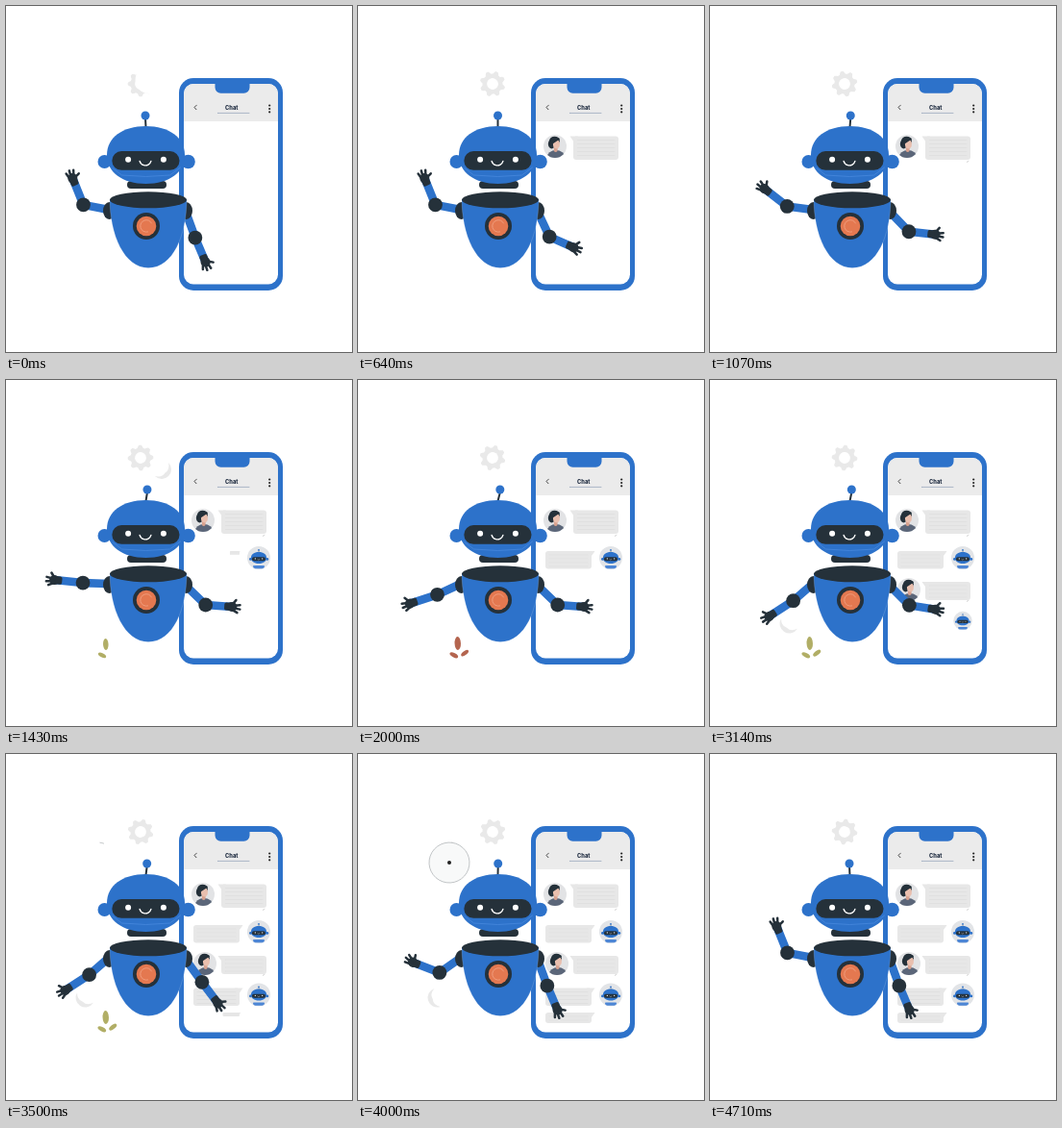
An HTML page with a canvas for the animation above (4.78 s loop, 360x360 px).

```html
<!DOCTYPE html>
<html lang="en">
<head>
<meta charset="utf-8">
<title>Chat robot</title>
<style>
html, body { margin: 0; width: 100%; height: 100%; overflow: hidden; background: #fff; }
canvas { display: block; width: 360px; height: 360px; }
</style>
</head>
<body>
<canvas id="stage"></canvas>
<script>
const LOOP = 4780;
const BLUE = '#2d72ca', DARK = '#25313a', GREY = '#e7e7e7', PALE = '#e9e9e9', HEADER = '#ebebeb';
const canvas = document.getElementById('stage');
const ctx = canvas.getContext('2d');
const ratio = window.devicePixelRatio || 1;
canvas.width = canvas.height = 360 * ratio;

const rad = deg => deg * Math.PI / 180;
const clamp = v => Math.max(0, Math.min(1, v));
const span = (t, from, to) => clamp((t - from) / (to - from));
const easeOut = p => 1 - (1 - p) ** 2;
const grow = (t, from, to) => easeOut(span(t, from, to));

// Interpolates rows of [time, ...values].
function track(rows, t) {
  const next = rows.findIndex(row => row[0] > t);
  if (next === 0) return rows[0].slice(1);
  if (next < 0) return rows[rows.length - 1].slice(1);
  const a = rows[next - 1], b = rows[next], p = span(t, a[0], b[0]);
  return a.slice(1).map((v, i) => v + (b[i + 1] - v) * p);
}

// Rows of [time, upper arm, forearm, hand], angles in degrees.
const LEFT_ARM = [
  [720, 191, 248, 262], [1140, 187, 212, 222], [1430, 182, 186, 188], [1800, 165, 171, 172],
  [2330, 139, 147, 155], [3500, 139, 147, 155], [4000, 145, 201, 230], [4640, 191, 248, 262]
];
const RIGHT_ARM = [
  [150, 70, 67, 62], [640, 65, 24, 18], [1120, 44, 4, 2],
  [3100, 44, 4, 2], [3500, 54, 53, 48], [3850, 70, 67, 62]
];

function fill(color) { ctx.fillStyle = color; ctx.fill(); }

function ellipse(x, y, rx, ry, color) {
  ctx.beginPath();
  ctx.ellipse(x, y, rx, ry, 0, 0, Math.PI * 2);
  fill(color);
}
const disc = (x, y, r, color) => ellipse(x, y, r, r, color);

function box(x, y, w, h, r, color) {
  ctx.beginPath();
  ctx.roundRect(x, y, w, h, r);
  fill(color);
}

function stroke(color, width) {
  ctx.strokeStyle = color;
  ctx.lineWidth = width;
  ctx.lineCap = ctx.lineJoin = 'round';
  ctx.stroke();
}

function line(points, color, width) {
  ctx.beginPath();
  points.forEach(([x, y]) => ctx.lineTo(x, y));
  stroke(color, width);
}

function arc(x, y, r, from, to, color, width) {
  ctx.beginPath();
  ctx.arc(x, y, r, rad(from), rad(to));
  stroke(color, width);
}

function place(x, y, scale, angle, draw) {
  if (scale <= 0) return;
  ctx.save();
  ctx.translate(x, y);
  ctx.rotate(rad(angle));
  ctx.scale(scale, scale);
  draw();
  ctx.restore();
}

function phone() {
  box(180, 75, 108, 221, 15, BLUE);
  box(185, 81, 98, 208.5, 10, '#fff');
  box(185, 81, 98, 39, [10, 10, 0, 0], HEADER);
  box(217.5, 79, 36, 11.7, [0, 0, 6, 6], BLUE);
  line([[198, 103.3], [196, 105.5], [198, 107.7]], '#444', 1);
  [103.5, 107, 110.3].forEach(y => disc(274.2, y, 1.1, '#222'));
  ctx.fillStyle = '#1f2c40';
  ctx.font = '800 5.7px Inter, sans-serif';
  ctx.textAlign = 'center';
  ctx.fillText('Chat', 234.8, 107.6);
  line([[220, 111.4], [253, 111.4]], '#9aa9bd', 0.8);
}

// The bubble grows out of its top corner, next to the avatar.
function bubble(x, y, w, h, fromLeft, scale) {
  place(fromLeft ? x : x + w, y, scale, 0, () => {
    const d = fromLeft ? 1 : -1;
    box(fromLeft ? 0 : -w, 0, w, h, 3, GREY);
    ctx.beginPath();
    ctx.moveTo(-3.5 * d, 0);
    ctx.lineTo(5 * d, 0);
    ctx.lineTo(0, 5);
    fill(GREY);
    for (let row = 4; row < h - 2; row += 4) {
      line([[4 * d, row], [(w - 4) * d, row]], '#dfdfdf', 0.7);
    }
  });
}

function personAvatar(x, y, scale) {
  place(x, y, scale, 0, () => {
    disc(0, 0, 12, '#e2e3e5');
    ctx.save();
    ctx.beginPath();
    ctx.arc(0, 0, 12, 0, Math.PI * 2);
    ctx.clip();
    ellipse(1, 12, 9.5, 8, '#5b6679');
    ellipse(-3.5, -2.5, 3.6, 5, DARK);
    ellipse(-0.5, -5.5, 5.4, 4.8, DARK);
    box(-1.2, 0, 3.8, 6, 2, '#d9a28f');
    ellipse(1.4, -2.2, 3.5, 4.6, '#e9bfae');
    ctx.beginPath();
    ctx.ellipse(0, -5.5, 5.4, 3.4, -0.4, Math.PI * 0.8, Math.PI * 2);
    fill(DARK);
    ctx.restore();
  });
}

// An oval with fuller corners than an ellipse.
function dome(rx, ry, color) {
  const k = 0.6;
  ctx.beginPath();
  ctx.moveTo(-rx, 0);
  ctx.bezierCurveTo(-rx, -ry * k, -rx * k, -ry, 0, -ry);
  ctx.bezierCurveTo(rx * k, -ry, rx, -ry * k, rx, 0);
  ctx.bezierCurveTo(rx, ry * k, rx * k, ry, 0, ry);
  ctx.bezierCurveTo(-rx * k, ry, -rx, ry * k, -rx, 0);
  fill(color);
}

function head(sway) {
  line([[0, -29], [sway, -38]], DARK, 2);
  disc(sway, -41, 4.5, BLUE);
  disc(-43, 7, 7, BLUE);
  disc(44, 7, 7.3, BLUE);
  dome(40.5, 30, BLUE);
  line([[-34, 14], [-25, 21], [0, 22.5], [25, 21], [36, 13]], '#4b8ce0', 0.7);
  box(-35.2, -4, 70.2, 19.8, 10, DARK);
  disc(-18.4, 4.7, 3, '#fff');
  disc(18.4, 4.7, 3, '#fff');
  arc(-0.5, 4.8, 6.1, 15, 165, '#fff', 1.4);
}

function robotAvatar(x, y, scale) {
  place(x, y, scale, 0, () => {
    disc(0, 0, 12, '#e2e4e7');
    place(0, 0, 0.2, 0, () => head(0));
    box(-6, 8, 12, 3.2, [1, 1, 3, 3], '#4d86d5');
  });
}

function chat(t) {
  personAvatar(205, 146, grow(t, 150, 400));
  bubble(224, 135.5, 47, 24.5, true, grow(t, 330, 620));
  robotAvatar(263, 185, grow(t, 1160, 1420));
  bubble(195, 178, 48, 18.5, false, grow(t, 1400, 1680));
  personAvatar(207, 218, grow(t, 2420, 2760));
  bubble(224, 210, 47, 19, true, grow(t, 2450, 2740));
  robotAvatar(263, 250.5, grow(t, 3000, 3250));
  bubble(195, 243.5, 48, 18.5, false, grow(t, 3180, 3440));
  bubble(195, 269, 48, 11, false, grow(t, 3440, 3740));
  if (t > 800) line([[267, 162.4], [269, 161.4]], '#ccc', 0.8);
  if (t > 2950) line([[267, 230.4], [269, 229.4]], '#ccc', 0.8);
}

function hand(side) {
  ellipse(0, 0, 5.3, 5, DARK);
  [[5.5, -6], [8.3, -2.4], [8.3, 2]].forEach(([x, y]) =>
    line([[0, y * 0.5 * side], [x, y * side]], DARK, 2.5));
  line([[0, 2 * side], [4, 7 * side]], DARK, 2.5);
}

function arm(x, y, upper, lower, [a, b, c], side) {
  const ex = x + upper * Math.cos(rad(a)), ey = y + upper * Math.sin(rad(a));
  const hx = ex + lower * Math.cos(rad(b)), hy = ey + lower * Math.sin(rad(b));
  line([[x, y], [ex, ey]], BLUE, 8.6);
  line([[ex, ey], [hx, hy]], BLUE, 8.6);
  disc(ex, ey, 7.4, DARK);
  place(hx, hy, 1, b, () => box(-8, -4.1, 9, 8.2, 2, DARK));
  place(hx, hy, 1, c, () => hand(side));
}

function robot(t) {
  arm(107, 212, 27, 29.8, track(LEFT_ARM, t), 1);
  arm(187, 214, 28.8, 27.5, track(RIGHT_ARM, t), -1);
  ellipse(107.5, 213, 6.5, 9, DARK);
  ellipse(187.5, 213, 6.5, 9, DARK);

  ctx.beginPath();
  ctx.moveTo(108, 201);
  ctx.bezierCurveTo(108, 238, 123, 272.5, 148, 272.5);
  ctx.bezierCurveTo(174, 272.5, 188, 238, 188, 201);
  fill(BLUE);
  stroke('rgba(255,255,255,.3)', 0.5);
  ellipse(148, 201.8, 40, 8.5, DARK);
  disc(146, 229, 14, DARK);
  disc(146, 229, 10.3, '#e47850');
  arc(146, 229, 6.2, 75, 330, '#f1a486', 0.8);

  box(126, 182, 41, 8, 4, DARK);
  place(145.5, 155, 1, 0, () => head(1 - 1.5 * Math.cos(t / LOOP * Math.PI * 2)));
}

function gear(t) {
  place(140, 81, 1, t * 0.03, () => {
    ctx.beginPath();
    for (let i = 0; i < 64; i++) {
      const a = i / 64 * Math.PI * 2;
      const r = 11.9 + 1.4 * Math.max(-1, Math.min(1, 2 * Math.cos(8 * a)));
      ctx.lineTo(r * Math.cos(a), r * Math.sin(a));
    }
    ctx.closePath();
    fill(PALE);
    disc(0, 0, 5.9, '#fff');
  });
  const shift = 1 + 2.6 * span(t, 0, 480);
  if (shift < 3.6) disc(140 + 8.5 * shift, 81 - 4 * shift, 14, '#fff');
}

// A moon shape whose thick side faces the given angle.
function crescent(x, y, r, angle, scale) {
  place(x, y, scale, angle, () => {
    ctx.beginPath();
    ctx.arc(0, 0, r, rad(-90), rad(90));
    ctx.quadraticCurveTo(r * 0.65, r * 0.6, r * 0.5, 0);
    ctx.quadraticCurveTo(r * 0.65, -r * 0.6, 0, -r);
    fill(PALE);
  });
}

function leaf(x, y, length, angle, scale, color) {
  place(x, y, scale, angle, () => ellipse(length / 2, 0, length / 2, length * 0.23, color));
}

function plant(t) {
  const fade = 1 - span(t, 3650, 3950);
  const color = t > 2000 && t < 3100 ? '#b4654f' : '#b1ae66';
  leaf(104, 281, 14, -92, fade * grow(t, 1150, 1600), color);
  leaf(104, 288.5, 9.5, 208, fade * grow(t, 1200, 1500), color);
  leaf(107.5, 287, 9.5, -38, fade * grow(t, 1500, 2100), color);
}

function clock(t) {
  if (t < 3480 || t > 4560) return;
  const turn = span(t, 3490, 3920) * 360;
  if (turn > 355) disc(95, 113, 21, '#f8f9f9');
  arc(95, 113, 21, -82, -81 + turn, '#a8acaf', 0.7);
  if (t > 3850) disc(95, 113, 2, '#222');
}

function draw(t) {
  ctx.setTransform(ratio, 0, 0, ratio, 0, 0);
  ctx.fillStyle = '#fff';
  ctx.fillRect(0, 0, 360, 360);
  gear(t);
  crescent(162, 93, 10, 45, grow(t, 1200, 1400) * (1 - span(t, 1600, 1800)));
  crescent(82.5, 253.5, 10, 122 + 40 * span(t, 3500, 4000),
    grow(t, 2300, 2600) * (1 - span(t, 4250, 4500)));
  plant(t);
  clock(t);
  phone();
  chat(t);
  robot(t);
}

function tick() {
  draw(performance.now() % LOOP);
  requestAnimationFrame(tick);
}
tick();
</script>
</body>
</html>
```
